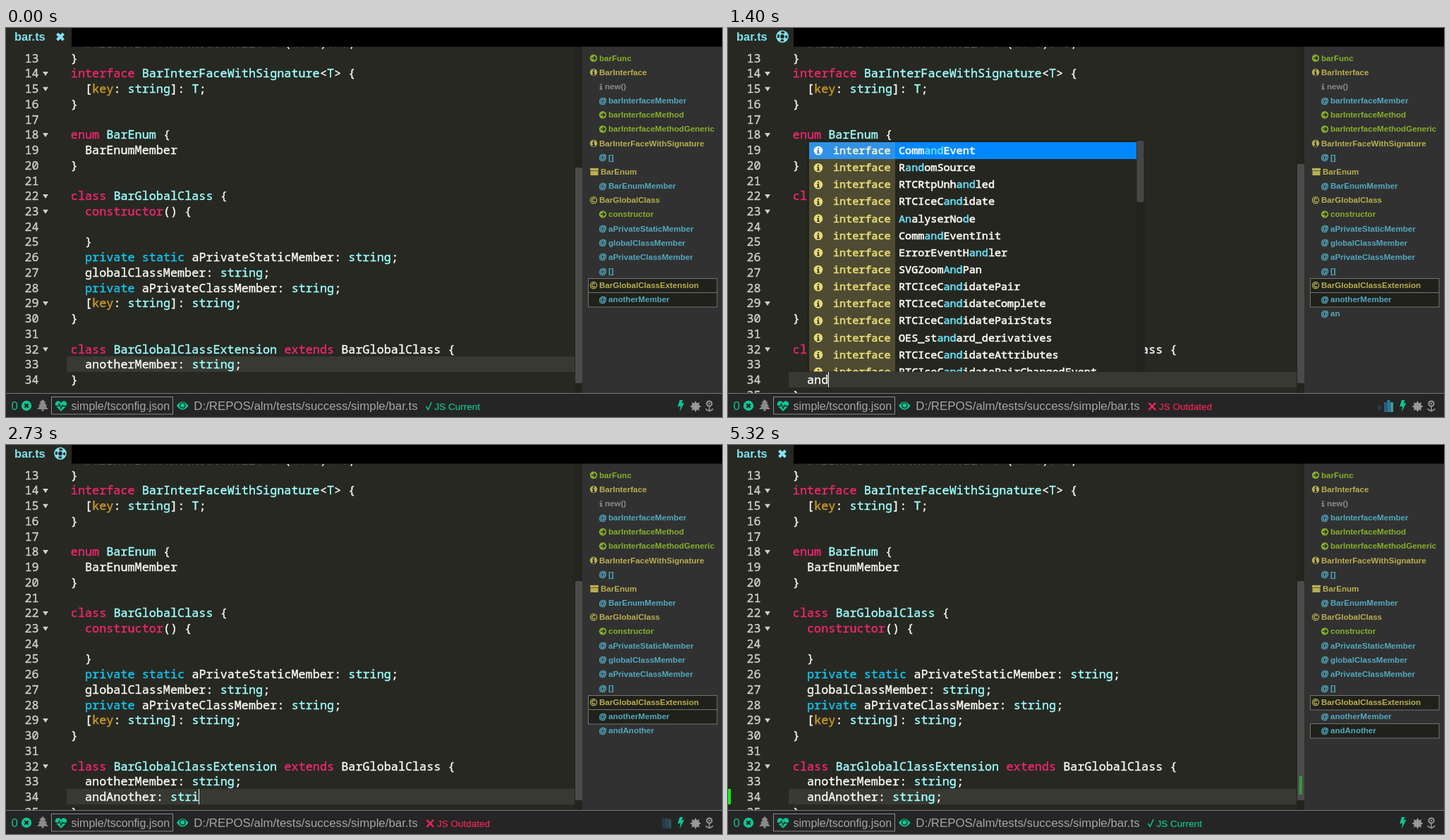
Animation, 1015 px wide and 552 px high, one loop 5.6 s. Source, as an HTML page:

```html
<!DOCTYPE html>
<html lang="en">
<head>
<meta charset="utf-8">
<title>bar.ts</title>
<style>
html, body { margin: 0; width: 100%; height: 100%; overflow: hidden; background: #272822; }
svg { display: block; width: 1015px; height: 552px; }
.code { font: 500 16.81px "Noto Sans Mono", monospace; stroke-width: 0.4px; }
.hint { font: 500 15.1px "Noto Sans Mono", monospace; stroke-width: 0.65px; }
.tree { font: bold 11.55px "Liberation Sans", Arial, sans-serif; stroke-width: 0; }
.at { font: bold 11.3px "Liberation Sans", Arial, sans-serif; stroke-width: 0.5px; }
.tab { font: bold 16.4px "Liberation Sans", Arial, sans-serif; }
.ui { font: 16px "Liberation Sans", Arial, sans-serif; stroke-width: 0; }
.path { font: 16.85px "Liberation Sans", Arial, sans-serif; stroke-width: 0; }
.small { font: 13.5px "Liberation Sans", Arial, sans-serif; stroke-width: 0.2px; }
.count { font: 9px "Liberation Sans", Arial, sans-serif; stroke-width: 0; }
</style>
</head>
<body>
<svg id="stage" viewBox="0 0 1015 552" xmlns="http://www.w3.org/2000/svg">
  <defs>
    <clipPath id="editorClip"><rect y="27" width="806" height="491"/></clipPath>
    <clipPath id="hintClip"><rect x="112" y="158" width="480" height="329.5"/></clipPath>
  </defs>
  <rect width="1015" height="552" fill="#272822"/>
  <g id="editor" clip-path="url(#editorClip)"></g>
  <rect x="806" y="26" width="11" height="492" fill="#23231f"/>
  <rect x="817" y="26" width="198" height="492" fill="#313131"/>
  <g id="outline"></g>
  <rect width="1015" height="26.5" fill="#000"/>
  <rect width="93" height="27" fill="#272822"/>
  <text class="tab" x="12" y="18" fill="#7fe3f0">bar.ts</text>
  <rect y="518" width="1015" height="34" fill="#252525"/>
  <rect y="518" width="1015" height="1" fill="#777"/>
  <g id="status"></g>
  <g id="live"></g>
</svg>
<script>
const TICK = 70, LOOP = 5600;
const X0 = 91.85, CW = 10.09, LINE = 21.73;
const WHITE = '#f8f8f2', TYPE = '#9effff', PINK = '#f0266f', BLUE = '#12c4ee', GOLD = '#cc9826';
const GREEN = '#86b02a', OLIVE = '#b9ae50', CYAN = '#52a9bf', GREY = '#8a8a8a', OK = '#0cc793', RED = '#f0265a';

const $ = id => document.getElementById(id);

function add(parent, tag, attrs, body) {
  const node = document.createElementNS('http://www.w3.org/2000/svg', tag);
  for (const name in attrs) node.setAttribute(name, attrs[name]);
  if (body !== undefined) node.textContent = body;
  parent.appendChild(node);
  return node;
}
const rect = (p, x, y, width, height, fill, more) => add(p, 'rect', { x, y, width, height, fill, ...more });
const text = (p, cls, x, y, fill, s) => add(p, 'text', { class: cls, x, y, fill, stroke: fill }, s);
const path = (p, d, fill, more) => add(p, 'path', { d, fill, ...more });
const stroke = (p, d, color, width, more) =>
  path(p, d, 'none', { stroke: color, 'stroke-width': width, ...more });
const disc = (p, cx, cy, r, fill, more) => add(p, 'circle', { cx, cy, r, fill, ...more });

// ---------- code ----------
const FIRST = 12;
const LINES = [
  '  barInterfaceMethodGeneric<T>(a: T): T;',
  '}',
  'interface BarInterFaceWithSignature<T> {',
  '  [key: string]: T;',
  '}',
  '',
  'enum BarEnum {',
  '  BarEnumMember',
  '}',
  '',
  'class BarGlobalClass {',
  '  constructor() {',
  '',
  '  }',
  '  private static aPrivateStaticMember: string;',
  '  globalClassMember: string;',
  '  private aPrivateClassMember: string;',
  '  [key: string]: string;',
  '}',
  '',
  'class BarGlobalClassExtension extends BarGlobalClass {',
  '  anotherMember: string;'
];
const lineTop = n => 488.2 + (n - 34) * LINE;
const baseline = n => lineTop(n) + 16.8;

function tokenColor(word, prev) {
  if (/^(class|interface|enum|extends|constructor)$/.test(word)) return PINK;
  if (/^(private|static)$/.test(word)) return BLUE;
  if (word === 'key') return GOLD;
  if (/^\w/.test(word) && /^(class|interface|enum|:|<)$/.test(prev)) return TYPE;
  return WHITE;
}
function drawCode(parent, n, source) {
  let prev = '';
  for (const m of source.matchAll(/\w+|\S/g)) {
    text(parent, 'code', X0 + m.index * CW, baseline(n), tokenColor(m[0], prev), m[0]);
    prev = m[0];
  }
}
const activeLine = rect($('editor'), 86, 466, 720, 22, '#383932');
LINES.forEach((source, i) => drawCode($('editor'), FIRST + i, source));
for (let n = 13; n <= 35; n++) {
  const label = text($('editor'), 'code', 26.5, baseline(n), '#cfcfca', n);
  if (n === 35) label.id = 'lastNumber';
  if ([14, 15, 18, 22, 23, 29, 32].includes(n)) {
    path($('editor'), `M52 ${lineTop(n) + 8.5}h8l-4 6z`, '#cfcfca');
  }
}
const typing = add($('editor'), 'g', {});

// ---------- outline ----------
const ROW = 20.15;
const rowMid = i => 42.7 + i * ROW;
const TREE = [
  'f0 barFunc', 'i0 BarInterface', 'n1 new()', '@1 barInterfaceMember', 'f1 barInterfaceMethod',
  'f1 barInterfaceMethodGeneric', 'i0 BarInterFaceWithSignature', '@1 []', 'e0 BarEnum',
  '@1 BarEnumMember', 'c0 BarGlobalClass', 'f1 constructor', '@1 aPrivateStaticMember',
  '@1 globalClassMember', '@1 aPrivateClassMember', '@1 []', 'c0 BarGlobalClassExtension',
  '@1 anotherMember'
];
const TREE_COLOR = { f: GREEN, i: OLIVE, n: GREY, '@': CYAN, e: OLIVE, c: OLIVE };

function infoMark(p, x, y, color) {
  rect(p, x - 0.9, y - 4, 2, 2, color);
  path(p, `M${x - 2} ${y - 1}h3v4h1v1.4h-4v-1.4h1v-2.6h-1z`, color);
}
function treeIcon(p, kind, x, y, color) {
  const cx = x + 5, bg = '#2b2b2a';
  if (kind === '@') text(p, 'at', x - 0.5, y + 3.6, color, '@');
  if (kind === 'n') infoMark(p, x + 2.5, y, color);
  if (kind === 'e') {
    rect(p, x, y - 5, 12, 3.2, color);
    rect(p, x + 0.5, y - 1.2, 11, 6.4, color);
  }
  if (kind === 'f') {
    disc(p, cx, y, 5.2, color);
    stroke(p, `M${cx - 3} ${y}h5.4M${cx + 0.2} ${y - 2.8}l2.8 2.8l-2.8 2.8`, bg, 1.5);
  }
  if (kind === 'i') {
    disc(p, cx, y, 5.2, color);
    infoMark(p, cx, y, bg);
  }
  if (kind === 'c') {
    disc(p, cx, y, 4.6, 'none', { stroke: color, 'stroke-width': 1.3 });
    stroke(p, `M${cx + 2} ${y - 1.4}a2.4 2.4 0 1 0 0 2.8`, color, 1.4);
  }
}
function treeRow(p, i, spec) {
  const kind = spec[0], x = 828 + 13 * spec[1], color = TREE_COLOR[kind];
  const gap = kind === 'e' ? 15 : kind === 'n' ? 8 : 13;
  treeIcon(p, kind, x, rowMid(i), color);
  text(p, 'tree', x + gap, rowMid(i) + 4, color, spec.slice(3));
}
const marks = add($('outline'), 'g', {});
TREE.forEach((spec, i) => treeRow($('outline'), i, spec));

function drawMarks(k) {
  marks.replaceChildren();
  const dark = '#20211b', line = { stroke: '#747474' };
  const box = (y, h) => rect(marks, 825.5, y, 182.5, h, dark, line);
  if (k < 55) {
    box(355.5, 20);
    box(375.5, 20.5);
  } else if (k === 55) {
    rect(marks, 825, 355, 183, 41, dark);
    stroke(marks, 'M825.5 375V355.5H1008V375', '#747474', 1);
    box(395.5, 20.5);
  } else {
    box(355.5, 20.5);
    box(395.5, 20.5);
  }
}

// ---------- status bar ----------
function drawStatus(p) {
  text(p, 'path', 7.5, 542, OK, '0');
  disc(p, 29, 536, 7.2, OK);
  stroke(p, 'M26.4 533.4l5.2 5.2m0-5.2l-5.2 5.2', '#252525', 2.2);
  path(p, 'M52 527l5 5h-2.5l4 4.5h-2.5l4 4.5h-6.5v2.5h-3v-2.5h-6.5l4-4.5h-2.5l4-4.5h-2.5z', GREY);
  rect(p, 64.5, 523.5, 172, 24.5, 'none', { stroke: GREY });
  path(p, 'M78 544l-7.2-7.2c-3-4 1.2-9.6 5.6-6.6l1.6 1.5l1.6-1.5c4.4-3 8.6 2.6 5.6 6.6z', OK);
  stroke(p, 'M69 536.5h5l1.6-3.2l2.4 6.4l2-4.6l.8 1.4h6', '#252525', 1.3);
  text(p, 'ui', 92.5, 541.8, '#a6a6a6', 'simple/tsconfig.json');
  path(p, 'M242 536q8.2-11.6 16.6 0q-8.4 11.6-16.6 0z', OK);
  disc(p, 250.3, 535.6, 4.4, '#252525');
  disc(p, 250.3, 535.6, 3, OK);
  text(p, 'path', 266.3, 541.8, '#a6a6a6', 'D:/REPOS/alm/tests/success/simple/bar.ts');

  path(p, 'M955 528h4.6l-2 4.6l3.8-.8l-6.4 13l1.2-8.2l-4 .9z', OK);
  let star = '';
  for (let i = 0; i < 16; i++) {
    const a = i * Math.PI / 8 - Math.PI / 2, r = i % 2 ? 5 : 8;
    star += `${i ? 'L' : 'M'}${(977.5 + r * Math.cos(a)).toFixed(2)} ${(537 + r * Math.sin(a)).toFixed(2)}`;
  }
  path(p, star + 'z', '#999');
  disc(p, 997, 533, 3.6, 'none', { stroke: '#999', 'stroke-width': 2 });
  disc(p, 997, 533, 1.2, '#999');
  stroke(p, 'M997 537v7.5M997 543q-4 0-5-3M997 543q4 0 5-3', '#999', 1.5);
}
drawStatus($('status'));

// ---------- typing and completion ----------
const TYPED = 'andAnother: string;';
const KEY_TICKS = [14, 16, 19, 22, 24, 26, 27, 29, 30, 31, 33, 34, 35, 36, 37, 39, 40, 41, 42];
const typedAt = k => TYPED.slice(0, KEY_TICKS.filter(at => at <= k).length);

const BROAD = ['CommandEvent', 'RandomSource', 'RTCRtpUnhandled', 'RTCIceCandidate', 'AnalyserNode',
  'CommandEventInit', 'ErrorEventHandler', 'SVGZoomAndPan', 'RTCIceCandidatePair',
  'RTCIceCandidateComplete', 'RTCIceCandidatePairStats', 'OES_standard_derivatives',
  'RTCIceCandidateAttributes', 'RTCIceCandidatePairChangedEvent'];
const NARROW = ['SVGZoomAndPan', 'SVGAnimatedAngle', 'SVGAnimatedBoolean', 'ConstrainDoubleRange',
  'RTCIceCandidatePairChangedEvent', 'SVGAnimatedTransformList', 'SVGAnimatedEnumeration',
  'MSTransportDiagnosticsStats', 'oncompassneedscalibration', 'ConstrainVideoFacingModeParameters'];

// Indices of the query letters in order, or null
function fuzzy(name, query) {
  const hits = [];
  let from = 0;
  for (const ch of query.toLowerCase()) {
    const at = name.toLowerCase().indexOf(ch, from);
    if (at < 0) return null;
    hits.push(at);
    from = at + 1;
  }
  return hits;
}

function drawHints(live, query) {
  if (query.length < 3) return;
  const broad = query.length === 3, pitch = 24.14;
  const items = (broad ? BROAD : NARROW).filter(name => fuzzy(name, query));
  if (!items.length) return;
  const top = Math.max(162, 484 - items.length * pitch);
  const right = broad ? 579 : 566, split = broad ? 237 : 234.5;
  const g = add(live, 'g', { 'clip-path': 'url(#hintClip)' });
  rect(g, 112, Math.floor(top) - 3, (broad ? 591 : 569) - 112, 490 - top, '#22231d');
  rect(g, 115, top, right - 115, 490 - top, '#25261f');
  items.forEach((name, i) => {
    const y = top + i * pitch, mid = y + pitch / 2, chosen = i === 0;
    const rowTop = Math.floor(y), rowHeight = Math.floor(y + pitch) - rowTop;
    const isVar = name === 'oncompassneedscalibration';
    const tint = isVar ? '#66d9ef' : '#e6db74';
    if (chosen) rect(g, 115, rowTop, right - 115, rowHeight, '#0087ff');
    rect(g, 115, rowTop, split - 115, rowHeight, chosen ? '#2f92e6' : isVar ? '#36494a' : '#4e4b32');
    if (isVar) text(g, 'hint', 123.5, mid + 5, tint, '@');
    else {
      disc(g, 128, mid, 6.3, chosen ? WHITE : tint);
      infoMark(g, 128, mid, chosen ? '#2f92e6' : '#3b3926');
    }
    text(g, 'hint', split - 88, mid + 5, chosen ? '#f4f0c8' : tint, isVar ? 'var' : 'interface');
    const label = text(g, 'hint', split + 5, mid + 5, WHITE, '');
    const hits = fuzzy(name, query);
    [...name].forEach((ch, c) => {
      const color = hits.includes(c) ? '#66d9ef' : WHITE;
      add(label, 'tspan', { fill: color, stroke: color }, ch);
    });
  });
  if (broad) {
    rect(g, 579, 160, 11, 328, '#22231e');
    rect(g, 579.5, 160, 10, 87, '#464645', { rx: 1.5 });
  }
}

function drawPending(live, k) {
  if (k < 9 || k > 48) return;
  const phase = (k - 8) % 9, dim = phase > 3 && phase < 7;
  const upright = phase === 3;
  const g = add(live, 'g', { opacity: dim ? 0.4 : 1 });
  if (!dim) text(g, 'count', 921, 541.5, '#2f6f92', upright ? 0 : phase < 2 ? 2 : 1);
  const slant = upright ? 0 : 2;
  ['#2b5f80', '#2e7fa6', '#3f9a9c'].forEach((color, i) => {
    const x = 930 + i * 4.5, y = upright ? [531, 528, 531][i] : 528 + i;
    path(g, `M${x} ${y}l4 ${slant}v${545 - y - slant}l-4 ${-slant}z`, color);
  });
}

function drawTabIcon(live, dirty) {
  const color = '#7fe3f0';
  if (!dirty) {
    stroke(live, 'M72.5 8l9 9m0-9l-9 9', color, 4);
    return;
  }
  const ring = (r, width, more) => disc(live, 77, 12, r, 'none', { stroke: color, 'stroke-width': width, ...more });
  ring(8, 1.6);
  ring(3.6, 1.4);
  const quarter = 5.8 * Math.PI / 2;
  ring(5.8, 4, { 'stroke-dasharray': `${quarter * 0.5} ${quarter * 0.5}`, transform: 'rotate(22.5 77 12)' });
}

function drawBuildState(live, current) {
  if (current) {
    stroke(live, 'M595.5 537l2.8 4.5l5-10.5', OK, 1.5);
    text(live, 'small', 607.5, 541.5, OK, 'JS Current');
  } else {
    stroke(live, 'M596.5 532l9.5 10m0-10l-9.5 10', RED, 2.5);
    text(live, 'small', 611, 541.5, RED, 'JS Outdated');
  }
}

const outlineName = k =>
  k < 17 ? '' : k < 20 ? 'a' : k < 23 ? 'an' : k < 25 ? 'and' : k < 29 ? 'andA' : k < 33 ? 'andAno' : 'andAnother';
const caretOn = k => (k >= 5 && k < 49) || (k >= 56 && k < 63) || (k >= 69 && k < 76);

function draw(k) {
  const live = $('live'), edited = k >= 8, saved = k >= 68;
  const typed = typedAt(k);
  live.replaceChildren();
  typing.replaceChildren();

  activeLine.setAttribute('y', edited ? 488 : 466);
  $('lastNumber').setAttribute('visibility', edited ? 'visible' : 'hidden');
  drawCode(typing, edited ? 35 : 34, '}');
  if (edited) drawCode(typing, 34, '  ' + typed);
  if (typed && k < 19) rect(typing, 112, 507.5, typed.length * CW, 1.5, WHITE);

  const thumb = edited ? 193 : 198;
  rect(live, 807, thumb, 10, 504 - thumb, '#4b4b49', { rx: 1.5 });
  if (k >= 70) {
    rect(live, 0, 488, 4, 22, '#0df20d');
    rect(live, 809.5, 470, 4.5, 26, '#3d9440');
  }

  drawMarks(k);
  const name = outlineName(k);
  if (name) treeRow(live, TREE.length, '@1 ' + name);

  drawHints(live, typedAt(k - 1));
  if (caretOn(k)) {
    const col = edited ? 2 + typed.length : LINES[LINES.length - 1].length;
    rect(live, Math.floor(X0 + col * CW), edited ? 488 : 466, 1, 22, WHITE);
  }
  drawTabIcon(live, edited && !saved);
  drawBuildState(live, !edited || k >= 63);
  drawPending(live, k);
}

const start = performance.now();
let shown = -1;
function frame() {
  const k = Math.floor(((performance.now() - start) % LOOP) / TICK);
  if (k !== shown) draw(shown = k);
  requestAnimationFrame(frame);
}
frame();
</script>
</body>
</html>
```
